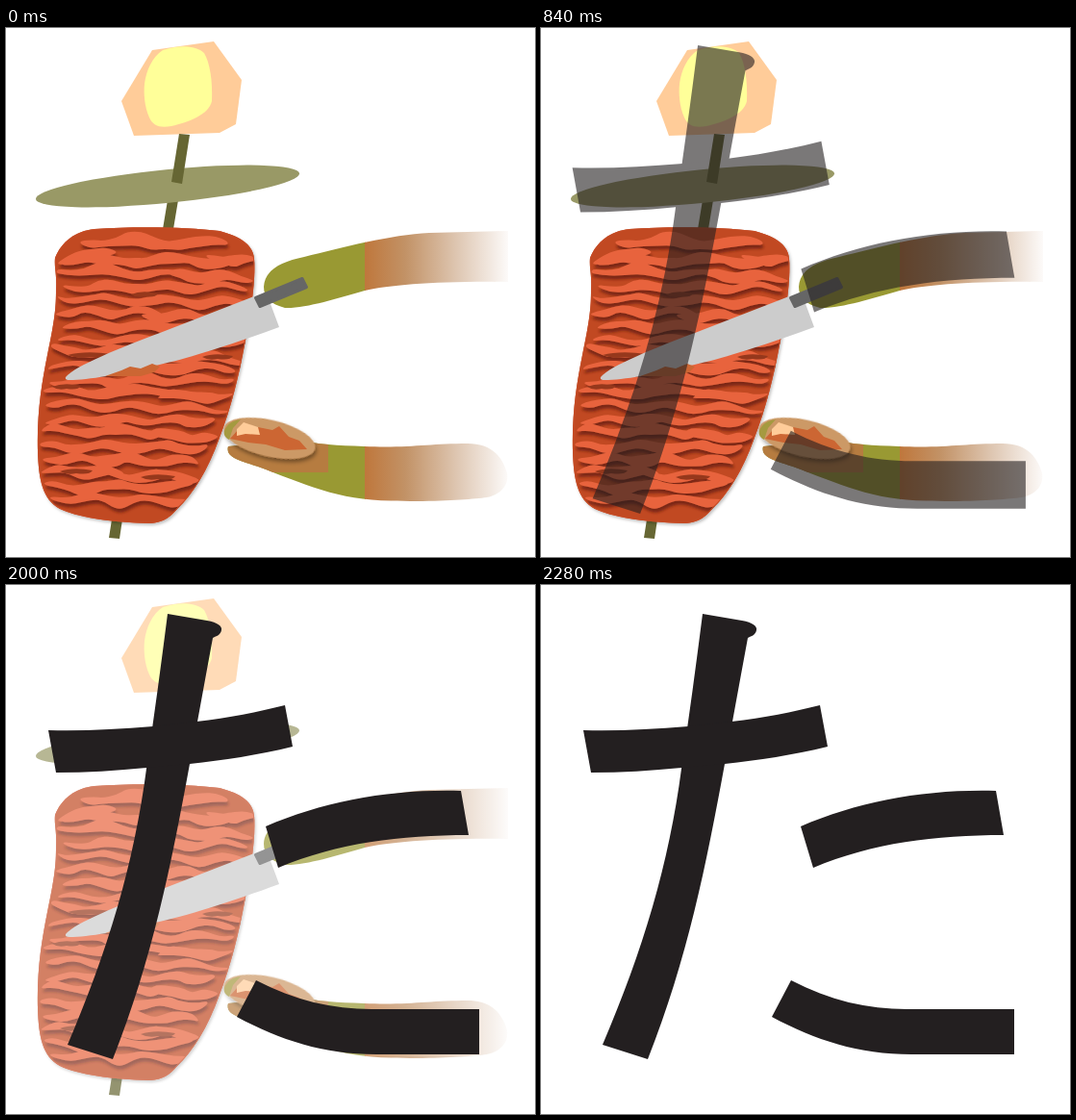
Animation of 550 by 550 pixels, one loop 3 s. Source, as an HTML page:

```html
<!DOCTYPE html>
<html lang="ja">
<head>
<meta charset="utf-8">
<title>た</title>
<style>
html, body { margin: 0; width: 100%; height: 100%; overflow: hidden; background: #fff; }
svg { display: block; width: 100%; height: 100%; }
</style>
</head>
<body>
<svg viewBox="0 0 550 550">
  <defs>
    <linearGradient id="sleeve" gradientUnits="userSpaceOnUse" x1="373" y1="0" x2="523" y2="0">
      <stop offset="0" stop-color="#bf773c"/>
      <stop offset=".28" stop-color="#c29266"/>
      <stop offset=".65" stop-color="#dfc8b4"/>
      <stop offset="1" stop-color="#fdfbfa"/>
    </linearGradient>
    <filter id="fold" x="-5%" y="-5%" width="110%" height="110%">
      <feDropShadow dx="1" dy="4" stdDeviation="1.7" flood-color="#641f0c" flood-opacity=".75"/>
    </filter>
    <filter id="soft" x="-20%" y="-20%" width="140%" height="150%">
      <feDropShadow dx="2" dy="3" stdDeviation="2" flood-color="#000" flood-opacity=".4"/>
    </filter>
    <filter id="faint" x="-20%" y="-20%" width="140%" height="140%">
      <feDropShadow dx="1.500" dy="2" stdDeviation="1.500" flood-color="#000" flood-opacity=".25"/>
    </filter>
    <path id="body" d="M51 239C58 222 72 211 92 209C135 206 190 207 222 211C245 217 257 226 258 240C260 262 254 300 248 330C242 362 234 395 222 426C210 460 194 485 178 500C170 510 162 514 150 515C110 514 75 509 56 500C38 490 34 470 33 440C32 400 37 370 43 340C51 302 52 290 52 272C53 255 50 250 51 239Z"/>
    <path id="top" d="M268 269C269 252 285 243 310 238C350 228 400 215 440 213L522 211V264C450 263 400 267 373 273C345 281 310 292 290 291C275 287 268 280 268 269Z"/>
    <path id="low" d="M231 435C228 446 240 449 262 456C310 474 345 491 400 491.500C450 493 485 490 500 488C515 485 523 475 521 463C515 441 500 432 480 432C440 432 420 437 372 435C345 434 325 433 300 428Z"/>
    <clipPath id="inBody"><use href="#body"/></clipPath>
    <clipPath id="inTop"><use href="#top"/></clipPath>
    <clipPath id="inLow"><use href="#low"/></clipPath>
  </defs>

  <g id="kebab">
    <path fill="#fc9" d="M120 76L152 23L216 14L245 54L239 100L222 109L133 112Z"/>
    <path fill="#ff9" d="M163 23C180 17 198 18 206 26C212 36 215 55 214 76C211 90 190 98 172 102C160 104 153 102 149 93C144 82 143 68 144 58C146 44 152 30 163 23Z"/>
    <path fill="#663" d="M168 179H179L174 209H163ZM110 511H121L118 531L107 530Z"/>
    <ellipse fill="#996" cx="168" cy="164.500" rx="137.700" ry="17.400" transform="rotate(-5.600 168 164.500)"/>
    <path fill="#663" d="M180 110L191 111L183 162L172 160Z"/>

    <use href="#body" fill="#c14a24" filter="url(#faint)"/>
    <g clip-path="url(#inBody)">
      <path id="strips" fill="#e8643e" filter="url(#fold)"/>
      <path id="holes" fill="#96381c"/>
      <use href="#body" fill="none" stroke="#c64c26" stroke-width="2"/>
    </g>

    <g clip-path="url(#inTop)">
      <path fill="#993" d="M260 200H374V300H260Z"/>
      <path fill="url(#sleeve)" d="M373 200H530V300H373Z"/>
    </g>
    <path fill="#ccc" d="M62 363C72 351 120 332 160 317L258 279L274 284L284 311C235 329 185 345 155 351C120 360 85 366 66 366Q61 366 62 363Z"/>
    <path fill="#c63" d="M103 362L120 356L129 352L140 354L152 349L160 352L154 358L140 362Z"/>
    <path fill="#666" stroke="#666" stroke-width="3" stroke-linejoin="round" d="M259.500 280.500L308 260.500L312.500 269.500L264 289.500Z"/>

    <g clip-path="url(#inLow)">
      <path fill="#993" d="M220 400H374V500H220Z"/>
      <path fill="#b67c40" d="M220 400H335V462H220Z"/>
      <path fill="url(#sleeve)" d="M373 400H530V500H373Z"/>
    </g>
    <ellipse fill="#c96" cx="274" cy="426.500" rx="48.500" ry="19" transform="rotate(13 274 426.500)" filter="url(#soft)"/>
    <path fill="#a59a40" d="M227 419C230 411 236 408 244 407L236 416L232 428C228 426 226 423 227 419Z"/>
    <path fill="#c63" d="M233 427L241 418L262 415L277 418L284 414L294 425L305 429L313 438L290 439L270 433L252 431Z"/>
    <path fill="#fc9" d="M240 417L247 410L262 415L264 423L249 422L240 424Z"/>
  </g>

  <g id="kana" fill="#231f20">
    <path d="M168 30L209 37C220 39 225 43 224 47C223 52 219 53 215 55C207 98 199 142 191 186C172 290 152 390 111 493L64 478C106 380 133 290 146 191C154 137 161 85 168 30Z"/>
    <path d="M44 151C80 152 115 150 153 147L198 142C232 138 262 132 290 125L298 168C262 177 226 182 191 186L146 190C115 193 84 195 52 195Z"/>
    <path d="M270 251C330 225 400 212 473 214L481 260C410 260 345 268 283 294Z"/>
    <path d="M260 411C300 432 340 441 380 441H492V488H385C330 488 285 473 240 449Z"/>
  </g>
</svg>

<script>
const LOOP = 3000, STEP = 40, STEPS = 10;
const KANA_IN = 640, KEBAB_OUT = 1920;
const CENTER = 263, GROW = 0.117;
const el = id => document.getElementById(id);

let seed = 29;
function rnd(a, b) {
  seed = (seed * 16807) % 2147483647;
  return a + (b - a) * seed / 2147483647;
}

// Closed outline rounded through the midpoints of its corners.
function smooth(pts) {
  const mid = (p, q) => [(p[0] + q[0]) / 2, (p[1] + q[1]) / 2];
  const text = p => p.map(v => v.toFixed(1)).join(" ");
  let d = "M" + text(mid(pts[pts.length - 1], pts[0]));
  pts.forEach((p, i) => {
    d += "Q" + text(p) + " " + text(mid(p, pts[(i + 1) % pts.length]));
  });
  return d + "Z";
}

// One wavy slice, thinner at both ends.
function slice(x0, x1, y, thick, tilt) {
  const n = Math.max(4, Math.round((x1 - x0) / 13));
  const phase = rnd(0, 6), wave = rnd(50, 80);
  const upper = [], lower = [];
  for (let i = 0; i <= n; i++) {
    const u = i / n;
    const x = x0 + (x1 - x0) * u;
    const mid = y + tilt * (u - 0.5) + 3.2 * Math.sin(phase + (x - x0) / wave * 6.28) + rnd(-1, 1);
    const half = thick / 2 * (0.3 + 0.7 * Math.sin(Math.PI * u) ** 0.4) * rnd(0.6, 1.4);
    upper.push([x + rnd(-3, 3), mid - half]);
    lower.unshift([x + rnd(-3, 3), mid + half]);
  }
  return smooth(upper.concat(lower));
}

function drawMeat() {
  let d = slice(78, 228, 223, 11, 2) + slice(54, 116, 237, 11, -14) + slice(210, 260, 240, 10, 6);
  for (let row = 0; row < 19; row++) {
    const y = 242 + row * 13.8;
    const left = y < 310 ? 53 : Math.max(36, 53 - (y - 310) * 0.2) + Math.max(0, y - 470) * 0.4;
    const right = 258 - Math.max(0, y - 290) ** 1.35 * 0.053;
    const tilt = rnd(-3, 8), cut = left + (right - left) * rnd(0.38, 0.68);
    if (row % 3 === 1) {
      d += slice(left, cut + 14, y - 2, 10, tilt) + slice(cut - 6, right, y + 3, 10, tilt);
    } else {
      d += slice(left + rnd(0, 8), right - rnd(0, 8), y, 10, tilt);
    }
  }
  el("strips").setAttribute("d", d);
  const holes = [[64, 340, 46], [204, 342, 32], [48, 373, 30], [140, 467, 36], [56, 461, 34], [130, 277, 28]];
  el("holes").setAttribute("d", holes.map(([x, y, w]) =>
    `M${x} ${y}q${w * 0.4} -5 ${w} -1q-3 5 ${-w * 0.5} 3q${-w * 0.3} 2 ${-w * 0.5} -2Z`).join(""));
}

// Number of steps finished, from 0 to STEPS.
function stepsSince(t, start) {
  return Math.max(0, Math.min(STEPS, Math.floor((t - start) / STEP) + 1));
}

function render(t) {
  const shown = stepsSince(t, KANA_IN);
  const gone = stepsSince(t, KEBAB_OUT);
  const scale = 1 + GROW * (STEPS - shown) / (STEPS - 1);
  el("kana").setAttribute("opacity", shown / STEPS);
  el("kana").setAttribute("transform",
    `translate(${CENTER} ${CENTER}) scale(${scale}) translate(${-CENTER} ${-CENTER})`);
  el("kebab").setAttribute("opacity", 1 - gone / STEPS);
}

drawMeat();
render(0);
const begin = performance.now();
function tick() {
  render((performance.now() - begin) % LOOP);
  requestAnimationFrame(tick);
}
requestAnimationFrame(tick);
</script>
</body>
</html>
```
